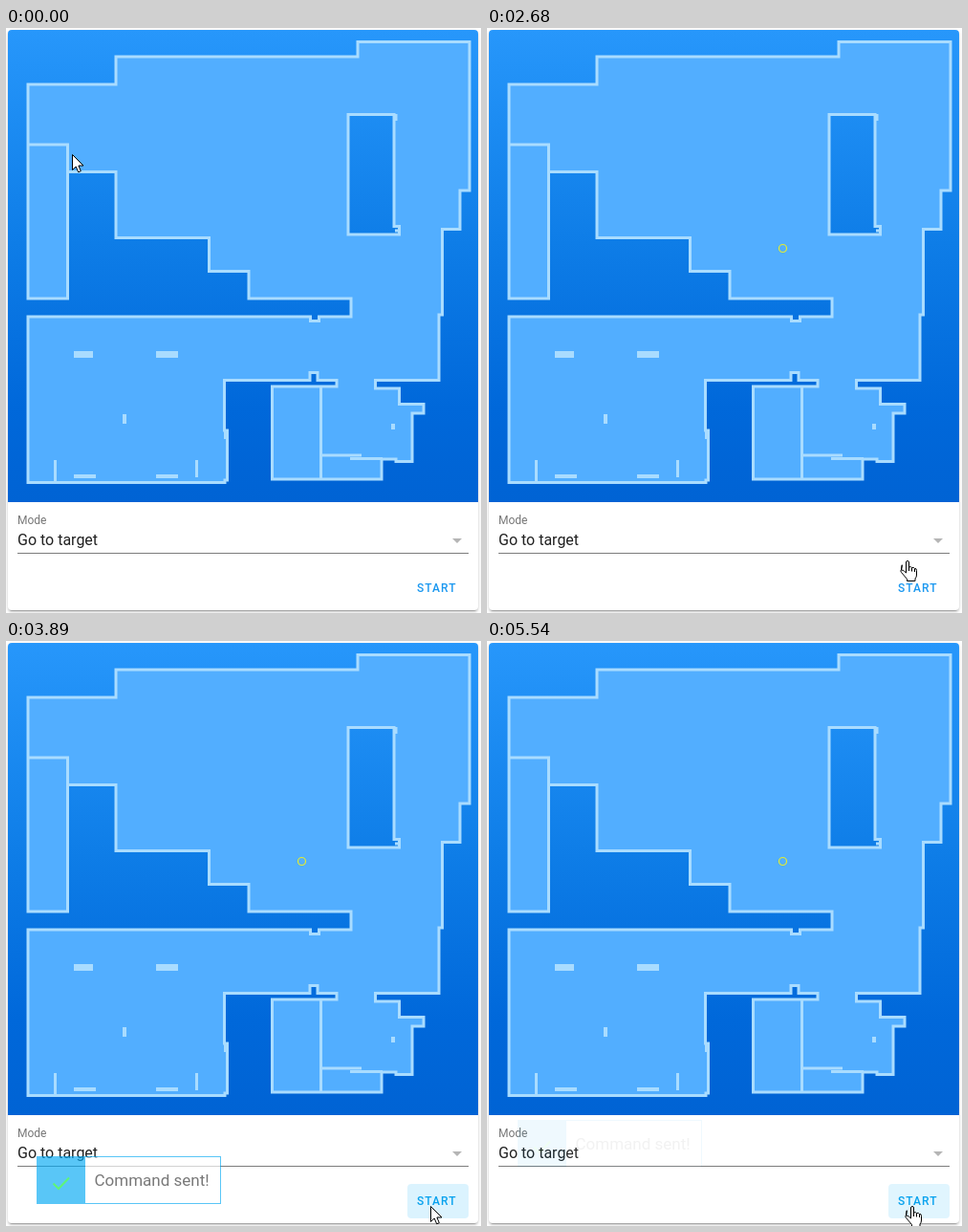
Recreate the animation shown at these times as an HTML page. Size 497 by 612 pixels, loop 5720 ms.

```html
<!DOCTYPE html>
<html lang="en">
<head>
<meta charset="utf-8">
<title>Vacuum map: go to target</title>
<style>
  html, body { margin: 0; width: 100%; height: 100%; overflow: hidden; background: #fff; }
  .card {
    position: absolute; left: 2px; top: 2px; width: 492px; height: 607px;
    background: #fff; border-radius: 4px;
    box-shadow: 0 3px 1px -2px rgba(0,0,0,.2), 0 2px 2px rgba(0,0,0,.14), 0 1px 5px rgba(0,0,0,.12);
  }
  svg { position: absolute; left: 0; top: 0; font-family: Roboto, sans-serif; }
  .wall { fill: none; stroke: #a9dcff; stroke-width: 3; }
  .start { font-size: 12px; font-weight: 500; letter-spacing: .0893em; }
</style>
</head>
<body>
<div class="card"></div>
<svg width="497" height="612" viewBox="0 0 497 612">
  <defs>
    <linearGradient id="sky" x2="0" y2="1">
      <stop stop-color="#2797fb"/>
      <stop offset=".45" stop-color="#0e7de7"/>
      <stop offset=".8" stop-color="#0068da"/>
      <stop offset="1" stop-color="#0063d4"/>
    </linearGradient>
    <clipPath id="buttonShape"><rect x="420" y="568" width="64" height="36" rx="4"/></clipPath>
  </defs>

  <path d="M2 496V6a4 4 0 0 1 4-4H490a4 4 0 0 1 4 4V496z" fill="url(#sky)"/>
  <path class="wall" style="fill:#52aeff" fill-rule="evenodd" d="
    M23 59H115V30H368V14.5H485V170H475V210.5H456.500V300H453V368.500H386.500V377H411.500V393.500H437V403H425V453.500H408V451H393V472H278.500V375H346V368.500H326V360.500H318V368.500H228.500V421H231.500V473H229V475.500H23V302H318.500V306.500H327.500V302H361V283H254V254.500H212.500V219.500H115V150.500H64.500V283H23z
    M358 90.500H406V207.500H411.500V216H358z"/>
  <path class="wall" d="M23 122H64.500V151M329.500 375V472M329.500 447H372M360 450.500H394M408 90V97M407 212H411M229.500 422V430"/>
  <path fill="#a9dcff" d="M71 338h20v7h-20zM157 338h23v7h-23zM122 404h4v10h-4zM50 452h3v23h-3zM71 467h23v4h-23zM157 467h23v4h-23zM198 452h3v18h-3zM403 414h4v6h-4z"/>
  <circle id="target" r="4" fill="none" stroke="#e6ec2c" stroke-width="1.2"/>

  <text x="12" y="519" font-size="12" fill="#757575">Mode</text>
  <text x="12" y="541" font-size="16" fill="#212121">Go to target</text>
  <path d="M467 534h10l-5 5z" fill="#b5b5b5"/>
  <path d="M12 549.500H484" stroke="#7d7d7d"/>

  <g clip-path="url(#buttonShape)" fill="#03a9f4">
    <rect id="focus" x="420" y="568" width="64" height="36"/>
    <circle id="ripple" cx="444" cy="591"/>
  </g>
  <text id="label" class="start" x="430" y="590">START</text>

  <g id="toast">
    <rect x="32.500" y="529.500" width="192" height="49" fill="#fff" stroke="#03a9f4"/>
    <rect x="32" y="529" width="51" height="50" fill="#03a9f4"/>
    <path d="M49.500 557.500L55 563L66 551.500" fill="none" stroke="#0bf030" stroke-width="2"/>
    <text x="92.500" y="560" font-size="17" fill="#333">Command sent!</text>
  </g>

  <g id="pointer" fill="#fff" stroke="#000" stroke-linejoin="round">
    <path id="arrow" d="M.5.5V16.500L4.200 13L6.700 18.800L9.300 17.700L6.900 12H12z"/>
    <path id="hand" d="M-.5 13V2Q-.5.5 1 .5T2.500 2V7Q4.500 6 5.500 7.500Q7.500 6.800 8.500 8.500Q10.500 8 10.500 10.500V15Q10.500 17.500 9 19V21.500H.5V19.500L-5.500 12.500Q-7 10.500-5.500 10Q-4-.5-5.500 10Q-3.500 9.500-.5 13zM2.500 7V11M5.500 8V11.500M8.500 9V12"/>
  </g>
  <circle id="click" r="12" fill="#ff0" fill-opacity=".47"/>
</svg>
<script>
const LOOP = 5720;
const el = id => document.getElementById(id);
const clamp = v => Math.max(0, Math.min(1, v));
const ramp = (t, from, length) => clamp((t - from) / length);
const within = (t, from, to) => t >= from && t < to;
const set = (id, attrs) => {
  for (const name in attrs) el(id).setAttribute(name, attrs[name]);
};
const show = (id, visible) => set(id, { visibility: visible ? "visible" : "hidden" });

// CSS "ease", cubic-bezier(.25, .1, .25, 1)
function ease(x) {
  let low = 0, high = 1;
  for (let i = 0; i < 20; i++) {
    const s = (low + high) / 2;
    if (.75 * s * (1 - s) + s ** 3 < x) low = s; else high = s;
  }
  return .3 * low * (1 - low) ** 2 + 3 * low * low * (1 - low) + low ** 3;
}

// first step, last step, step count, destination, sideways bow
const moves = [
  [50, 50, 1, 68, 123, 0, 0],
  [740, 840, 3, 197, 120, 0, -4],
  [1400, 1550, 4, 308, 230, 0, 0],
  [2090, 2650, 13, 437, 560, -36, 0],
  [2680, 2680, 1, 439, 557, 0, 0],
  [2730, 3010, 7, 444, 591, 0, 0]
];

// time, x, y, highlight end
const clicks = [
  [380, 68, 123, 560],
  [1020, 197, 120, 1250],
  [1660, 308, 230, 1910],
  [3420, 444, 591, 3600]
];

function pointerAt(t) {
  let x = 69, y = 132;
  for (const [start, end, steps, toX, toY, bowX, bowY] of moves) {
    if (t < start) break;
    const gap = (end - start) / (steps - 1) || 1;
    const p = clamp((Math.floor((t - start) / gap + 1e-6) + 1) / steps);
    const k = p * p * (3 - 2 * p), bow = Math.sin(Math.PI * p);
    x += (toX - x) * k + bowX * bow;
    y += (toY - y) * k + bowY * bow;
  }
  return [Math.round(x), Math.round(y)];
}

const stepped = (t, start, gap) => start + Math.floor((t - start) / gap + 1e-6) * gap;

function drawToast(t) {
  const leaving = t >= 5200;
  const opacity = leaving
    ? 1 - ease(ramp(Math.min(stepped(t, 5200, 340 / 7), 5540), 5141, 570))
    : ease(ramp(stepped(t, 3660, 50), 3670, 500));
  const shift = Math.round((leaving ? -30 : 30) * (1 - opacity));
  set("toast", { opacity, transform: `translate(0 ${shift})` });
}

function drawButton(t) {
  set("focus", { opacity: .12 * ramp(t, 3400, 250) });
  set("ripple", {
    r: 50 * Math.sqrt(ramp(t, 3400, 300)),
    opacity: .12 * (1 - ramp(t, 3600, 360))
  });
  set("label", { fill: t < 2730 ? "#1b98f0" : "#08a2ee" });
}

function draw(t) {
  const [x, y] = pointerAt(t);
  const isHand = t >= 2680 && !within(t, 3600, 4140);
  set("pointer", { transform: `translate(${x} ${y})` });
  show("hand", isHand);
  show("arrow", !isHand);

  const click = clicks.find(([from, , , to]) => within(t, from, to));
  show("click", click);
  if (click) set("click", { cx: click[1], cy: click[2] });

  const goal = clicks.slice(0, 3).filter(([from]) => t >= from).pop();
  show("target", goal);
  if (goal) set("target", { cx: goal[1] + 1.5, cy: goal[2] + .5 });

  drawButton(t);
  drawToast(t);
}

const began = performance.now();
function tick() {
  draw((performance.now() - began) % LOOP);
  requestAnimationFrame(tick);
}
tick();
</script>
</body>
</html>
```
